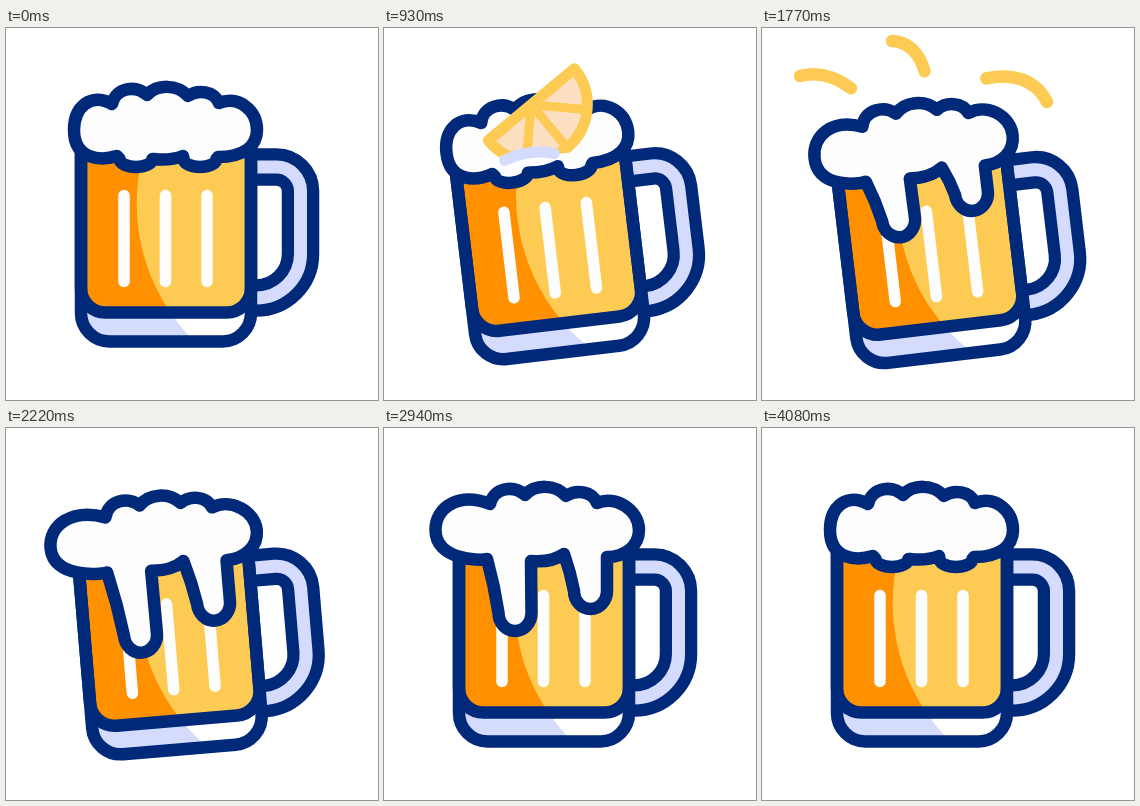
Recreate the animation shown at these times as an HTML page. Size 372 by 372 pixels, loop 4860 ms.

```html
<!DOCTYPE html>
<html lang="en">
<head>
<meta charset="utf-8">
<title>Beer mug</title>
<style>
  html, body { margin: 0; width: 100%; height: 100%; overflow: hidden; background: #fff; }
  svg { display: block; width: 100%; height: 100%; }
  path { stroke-linecap: round; stroke-linejoin: round; }
  .line { fill: none; stroke: #00297a; stroke-width: 12.5; }
  .splash { fill: none; stroke: #fdcb53; stroke-width: 12.5; }
</style>
</head>
<body>
<svg viewBox="0 0 372 372">
  <defs>
    <path id="glass" d="M75 110V285a28.5 28.5 0 0 0 28.5 28.5H216.5a28.5 28.5 0 0 0 28.5-28.5V110"/>
    <path id="beer" d="M75 110V260a24.5 24.5 0 0 0 24.5 24.5H220.5a24.5 24.5 0 0 0 24.5-24.5V110"/>
    <path id="shade" d="M60 100H136V130A195 195 0 0 0 183 308V314H60Z"/>
    <path id="handle" d="M245 139H270.5a24 24 0 0 1 24 24V226a44.5 44 0 0 1-44.5 44H245"/>
    <clipPath id="inGlass"><use href="#glass"/></clipPath>
    <clipPath id="inBeer"><use href="#beer"/></clipPath>
    <clipPath id="aboveFoam"><path d="M-100-300H500V116H176Q149 107 124 117H-100Z"/></clipPath>
  </defs>

  <path class="splash" pathLength="1" d="M116 92C100 62 68 40 38 48"/>
  <path class="splash" pathLength="1" d="M163 80C170 48 158 14 130 13"/>
  <path class="splash" pathLength="1" d="M178 78C202 48 264 32 285 74"/>

  <g id="mug">
    <g fill="none">
      <use href="#handle" stroke="#00297a" stroke-width="37.5"/>
      <use href="#handle" stroke="#d4dbfd" stroke-width="13"/>
    </g>
    <g clip-path="url(#inGlass)">
      <use href="#glass" fill="#fff"/>
      <use href="#shade" fill="#d4dbfd"/>
    </g>
    <g clip-path="url(#inBeer)">
      <use href="#beer" fill="#fdcb53"/>
      <use href="#shade" fill="#ff9100"/>
    </g>
    <path d="M118 167.5V253.5M159.500 167.5V253.5M201 167.5V253.5" fill="none" stroke="#fdfdfd" stroke-width="11.5"/>
    <use href="#beer" class="line"/>
    <use href="#glass" class="line"/>
    <path id="foam" class="line" style="fill:#fdfdfd"/>
    <g clip-path="url(#aboveFoam)">
      <g id="lemon">
        <path d="M-56 0A56 56 0 0 0 56 0Z" fill="#fbdfc0" stroke="#fdcb53" stroke-width="11"/>
        <path d="M0 0V54M0 0L38 38M0 0L-38 38" fill="none" stroke="#fdcb53" stroke-width="9"/>
      </g>
    </g>
    <path id="dent" fill="none" stroke="#d4dbfd" stroke-width="11"/>
  </g>
</svg>
<script>
const LOOP = 4860;
const $ = id => document.getElementById(id);
const mug = $('mug'), foam = $('foam'), lemon = $('lemon'), dent = $('dent');
const splashes = document.querySelectorAll('.splash');

// Tracks of [time, value]
const TILT = [[330, 0], [930, 1], [1950, 1], [2700, 0]];
const PUSH = [[930, 0], [1200, 1], [1950, 1], [2220, 0]];
const DRIP = [[1080, 0], [1380, .3], [1770, .8], [2220, 1.17], [2460, 1.14],
              [2940, 1], [3030, .95], [3540, .36], [3720, .15], [4000, 0]];
const HEAD = [[1200, 0], [1620, 1]];
const TAIL = [[1500, 0], [2120, 1]];
const DENT = [[840, 0], [920, 1], [1080, 1], [1180, 0]];

const linear = p => p;
const sine = p => (1 - Math.cos(Math.PI * p)) / 2;
const out = p => 1 - (1 - p) ** 2;
const mix = (a, b, p) => a + (b - a) * p;

function at(track, t, ease = linear) {
  if (t <= track[0][0]) return track[0][1];
  for (let i = 1; i < track.length; i++) {
    const [t0, a] = track[i - 1], [t1, b] = track[i];
    if (t <= t1) return mix(a, b, ease((t - t0) / (t1 - t0)));
  }
  return track[track.length - 1][1];
}

// One hanging drop from its right edge to its left edge: leg, round cap, leg
function drop([rx, ry], [x, y], [lx, ly], cap) {
  const w = 16.5, top = y - cap, bend = y - cap * .45;
  return `Q${mix(x + w, rx, .35)} ${mix(ry, top, .5)} ${x + w} ${top}` +
         `C${x + w} ${bend} ${x + 9} ${y} ${x} ${y}` +
         `S${x - w} ${bend} ${x - w} ${top}` +
         `Q${mix(x - w, lx, .35)} ${mix(ly, top, .5)} ${lx} ${ly}`;
}

function foamPath(k) {
  const c = Math.min(1, k * 4), cap = mix(8, 18, c);
  const left = 68 - 16.5 * k, right = 251 + 4 * k;
  const r2 = [212 + 11 * c, 129], b2 = [194 + 12.5 * c, 139 + 42 * k], l2 = [177 + 3 * c, 128 - 2 * c];
  const r1 = [148 - c, 131 + 2 * c], b1 = [130 + c, 139 + 64 * k], l1 = [111 - 8 * c, 128 + 3 * c];
  return 'M106 76C110 59 130 57 141 67C151 56 171 56 182 68C192 61 208 63 213 75' +
    `C232 67 ${right} 82 ${right} 102C${right} 118 ${238 + 3 * c} 129 ${r2}` +
    drop(r2, b2, l2, cap) +
    `Q${164 + 3 * c} ${133 + 2 * c} ${r1}` +
    drop(r1, b1, l1, cap) +
    `C95 133 ${left} 132 ${left} 102C${left} 79 ${85 - 10 * k} 64 106 76Z`;
}

function draw(t) {
  const push = at(PUSH, t, sine);
  mug.setAttribute('transform',
    `translate(${3.2 * push} ${3.8 * push}) rotate(${-6.8 * at(TILT, t, sine)} 261 160)`);
  foam.setAttribute('d', foamPath(at(DRIP, t)));

  const dt = t - 930;
  lemon.style.display = t > 600 && t < 1150 ? '' : 'none';
  lemon.setAttribute('transform',
    `translate(158 ${63 + .75 * dt + .0006 * dt * dt}) rotate(${-33 + .04 * dt})`);

  const d = at(DENT, t, sine);
  dent.style.display = d > 0 ? '' : 'none';
  dent.setAttribute('d', `M${150 - 25 * d} ${112 + 4 * d}Q150 ${112 - 5 * d} ${150 + 25 * d} ${112 + 3 * d}`);

  const head = at(HEAD, t, out), tail = at(TAIL, t);
  for (const s of splashes) {
    s.style.display = head > tail ? '' : 'none';
    s.setAttribute('stroke-dasharray', `${head - tail} 2`);
    s.setAttribute('stroke-dashoffset', -tail);
  }
}

const start = performance.now();
function tick() {
  draw((performance.now() - start) % LOOP);
  requestAnimationFrame(tick);
}
tick();
</script>
</body>
</html>
```
